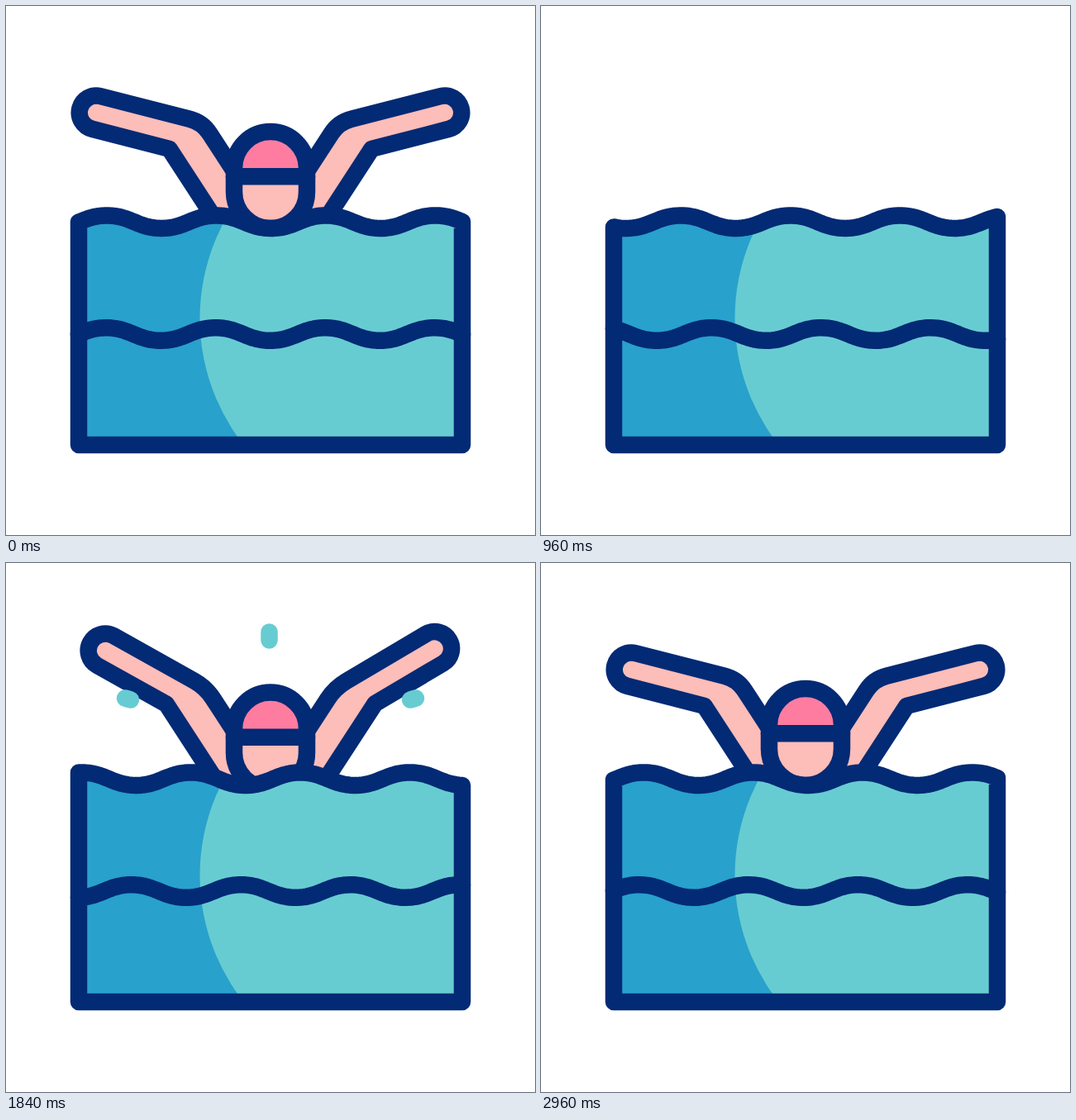
An HTML page that plays this animation: 640x640 px, repeating every 3 s.

```html
<!DOCTYPE html>
<html lang="en">
<head>
<meta charset="utf-8">
<title>Swimmer</title>
<style>
  html, body { margin: 0; width: 100%; height: 100%; overflow: hidden; background: #fff; }
  svg { display: block; width: 100%; height: 100%; }
  .line { stroke: #032a75; stroke-width: 20.5; stroke-linecap: round; stroke-linejoin: round; fill: none; }
  .skin { fill: #fdbdb8; }
  .drop { stroke: #67ccd1; stroke-width: 20.5; stroke-linecap: round; fill: none; }
</style>
</head>
<body>
<svg viewBox="0 0 640 640">
  <defs>
    <clipPath id="pool"><path id="poolShape"/></clipPath>
  </defs>

  <path id="armL" class="line skin"/>
  <g transform="translate(640) scale(-1 1)"><path id="armR" class="line skin"/></g>

  <g id="head">
    <rect x="276" y="152" width="88" height="117" rx="44" class="skin"/>
    <path d="M276 206V196a44 44 0 0 1 88 0v10z" fill="#fe7ca0"/>
    <rect x="276" y="152" width="88" height="117" rx="44" class="line"/>
    <path d="M276 206.3H364" class="line"/>
  </g>

  <g clip-path="url(#pool)">
    <rect x="88" y="240" width="464" height="292" fill="#28a1cc"/>
    <circle cx="482" cy="378" r="247.5" fill="#67ccd1"/>
    <rect x="482" y="240" width="80" height="292" fill="#67ccd1"/>
  </g>
  <path id="ripple" class="line"/>
  <path id="edge" class="line"/>

  <path class="drop" pathLength="1" d="M318.5 212.5V83.5"/>
  <path class="drop" pathLength="1" d="M217 217C200 190 176 172 144 163.5"/>
  <path class="drop" pathLength="1" d="M423 217C440 190 464 172 496 163.5"/>
</svg>

<script>
const LOOP = 3000, PERIOD = 132.5, DRIFT = 2 * PERIOD / 2987;
const FOREARM = 112, HAND = 20.5, UPPER = 25.5, REST = 14.4;
const U = [0.545, 0.838], NU = [0.838, -0.545];  // upper arm axis and its normal

const $ = id => document.getElementById(id);
const drops = document.querySelectorAll('.drop');
const add = (p, v, k) => [p[0] + v[0] * k, p[1] + v[1] * k];
const pt = p => p[0].toFixed(2) + ' ' + p[1].toFixed(2);

// Eased progress from 0 to 1 between two times
function ease(t, from, to) {
  const p = Math.min(1, Math.max(0, (t - from) / (to - from)));
  return p * p * (3 - 2 * p);
}

function wave(crest, mid) {
  const pts = [];
  for (let x = 88; x <= 552; x += 4) {
    const a = (x - crest) * 2 * Math.PI / PERIOD;
    pts.push(pt([x, mid - 8 * (Math.cos(a) - 0.03 * Math.cos(3 * a))]));
  }
  return 'M' + pts.join('L');
}

function arm(elbow, degrees) {
  const a = degrees * Math.PI / 180;
  const f = [Math.cos(a), Math.sin(a)], nf = [f[1], -f[0]];
  const det = nf[0] * NU[1] - nf[1] * NU[0];
  // Where the edges of forearm and upper arm meet on one side
  const corner = side => {
    const p = side * HAND, q = side * UPPER;
    return add(elbow, [p * NU[1] - q * nf[1], nf[0] * q - NU[0] * p], 1 / det);
  };
  const inner = corner(-1), outer = corner(1), hand = add(elbow, f, -FOREARM);
  return `M${pt(add(inner, U, 150))}L${pt(inner)}L${pt(add(hand, nf, -HAND))}` +
    `A${HAND} ${HAND} 0 0 1 ${pt(add(hand, nf, HAND))}L${pt(add(outer, f, -16))}` +
    `Q${pt(outer)} ${pt(add(outer, U, 16))}L${pt(add(outer, U, 150))}`;
}

function drawSwimmer(t) {
  const rise = ease(t, 1100, 1910), settle = ease(t, 2087, 2702);
  const sunk = 185 * (ease(t, 120, 800) - rise);
  const lift = 8 * (ease(t, 1840, 2087) - settle);
  const elbow = [217.6 + 0.06 * sunk, 156.8 + sunk - lift];
  const angle = (fold, peak) => t < 1000
    ? REST - fold * ease(t, 120, 800)
    : 16 + (peak - 16) * ease(t, 1300, 2087) - (peak - REST) * settle;
  $('armL').setAttribute('d', arm(elbow, angle(30, 33.2)));
  $('armR').setAttribute('d', arm(elbow, angle(23, 35)));
  $('head').setAttribute('transform', `translate(0 ${220 * (ease(t, 50, 840) - rise)})`);
}

function drawWater(t) {
  const top = wave(122 - DRIFT * t, 261.2) + 'L552 531L88 531Z';
  $('poolShape').setAttribute('d', top);
  $('edge').setAttribute('d', top);
  $('ripple').setAttribute('d', wave(253.5 + DRIFT * t, 397));
}

function drawDrops(t) {
  const s = t < 1120 ? t : t - 1120;
  const tip = ease(s, 305, 605), tail = ease(s, 472, 772);
  for (const drop of drops) {
    drop.style.display = tip > tail ? '' : 'none';
    drop.setAttribute('stroke-dasharray', `${tip - tail} 2`);
    drop.setAttribute('stroke-dashoffset', -tail);
  }
}

const start = performance.now();
function frame() {
  const t = (performance.now() - start) % LOOP;
  drawSwimmer(t);
  drawWater(t);
  drawDrops(t);
  requestAnimationFrame(frame);
}
frame();
</script>
</body>
</html>
```
